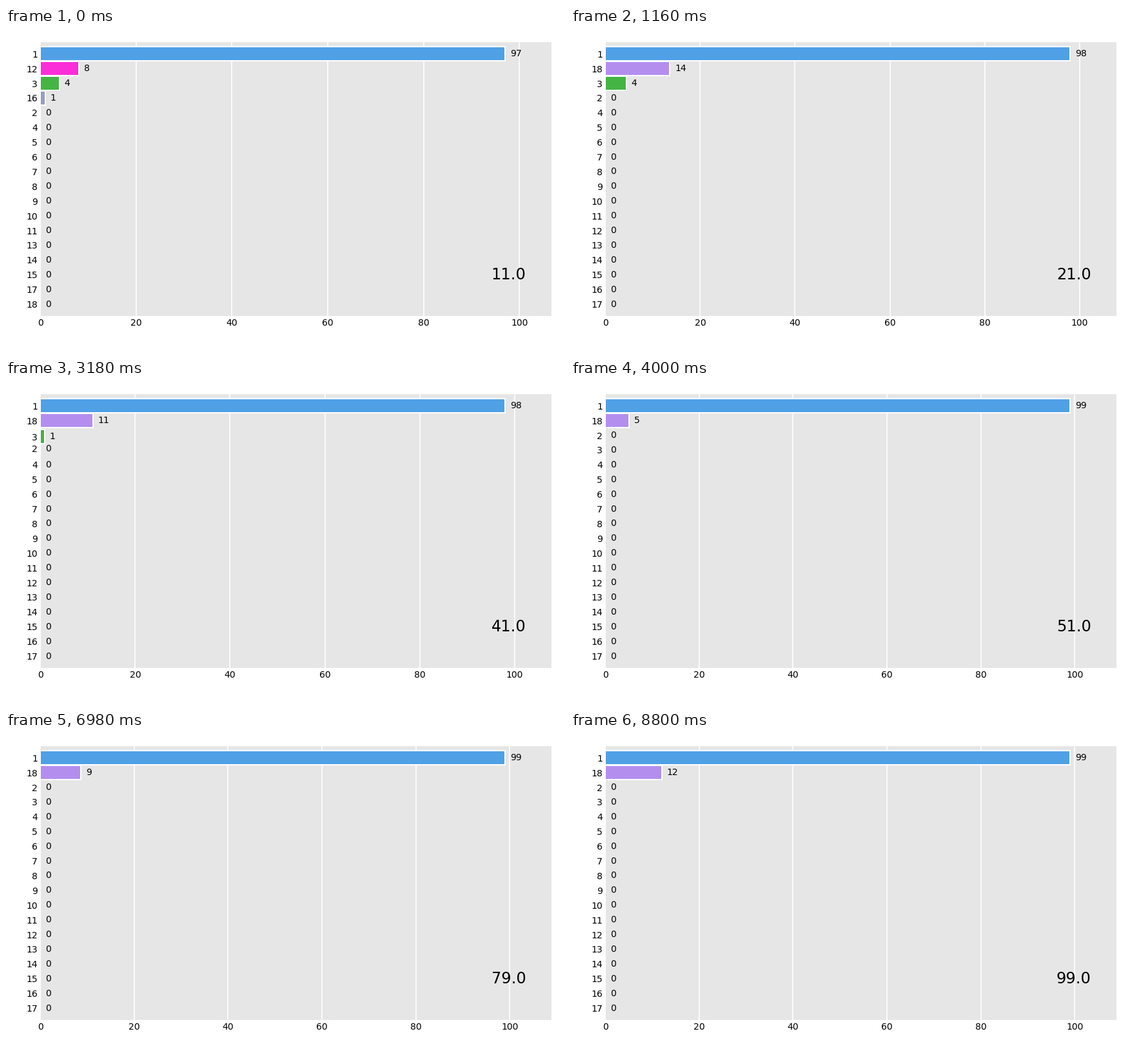
A matplotlib script for the animation above (8820 ms loop, 867 px wide and 504 px high).

```python
import matplotlib.pyplot as plt
import numpy as np
from matplotlib.animation import FuncAnimation

W, H, DPI = 867, 504, 144
LEFT, BOTTOM, AX_W, AX_H = 53.2, 56.07, 792.95, 426
STEPS = 10          # frames per period
BARS = 18
PERIODS = np.arange(11, 100, 2)
ROWS = np.arange(len(PERIODS))

COLORS = {1: "#50a0e6", 2: "#e57ba8", 3: "#44b444",
          12: "#fb2dd8", 16: "#93a0be", 18: "#b38eee"}


def track(*keys):
    """Whole-number values running straight between (row, value) keys."""
    return np.round(np.interp(ROWS, *zip(*keys)))


def challenger():
    """Runner-up: a few turning points with a little noise between them."""
    keys = [(0, 0), (3, 7), (10, 20), (11, 18), (12, 18), (16, 11),
            (17, 8), (18, 8), (22, 4), (23, 8), (24, 8), (25, 13),
            (26, 11), (31, 8), (32, 8), (34, 5), (35, 9), (44, 12)]
    noise = np.random.default_rng(5).integers(-1, 3, len(ROWS))
    noise[[row for row, _ in keys]] = 0
    return track(*keys) + noise


def race():
    """One row per period, one column per bar."""
    table = np.zeros((len(ROWS), BARS + 1))
    table[:, 1] = 97 + (ROWS >= 5) + (ROWS >= 17)
    table[:, 2] = track((0, 0), (3, 6), (5, 0))
    table[:, 3] = track((0, 4), (3, 8), (9, 1), (10, 0))
    table[:, 12] = track((0, 8), (3, 0))
    table[:, 16] = ROWS == 0
    table[:, 18] = challenger()
    # Brief returns of the small bars
    table[16, 3] = 1
    table[[36, 42], 2] = 1
    return table[:, 1:]


values = race()
# Largest value on top; ties keep column order
order = np.argsort(-values, axis=1, kind="stable")
places = BARS - np.argsort(order, axis=1)

plt.rcParams["font.family"] = "DejaVu Sans"
fig = plt.figure(figsize=(W / DPI, H / DPI), dpi=DPI, facecolor="white")
ax = fig.add_axes([LEFT / W, BOTTOM / H, AX_W / W, AX_H / H], facecolor=".9")
ax.set_ylim(.2, BARS + .8)
ax.set_xticks(range(0, 101, 20))
ax.set_yticks([])
ax.tick_params(labelsize=7, length=0, pad=2)
ax.grid(True, axis="x", color="white")
ax.set_axisbelow(True)
for spine in ax.spines.values():
    spine.set_visible(False)

bars = ax.barh(places[0], values[0], height=.95, ec="white", lw=1,
               color=[COLORS.get(i + 1, ".6") for i in range(BARS)])
names = [ax.text(-4 / AX_W, 0, str(i + 1), size=7, ha="right",
                 va="center_baseline", transform=ax.get_yaxis_transform())
         for i in range(BARS)]
labels = [ax.text(0, 0, "", size=7, ha="left", va="center")
          for _ in range(BARS)]
period = ax.text(.95, .15, "", size=12, ha="right", va="center",
                 transform=ax.transAxes)


def lerp(table, row, t):
    nxt = min(row + 1, len(table) - 1)
    return table[row] + (table[nxt] - table[row]) * t


def update(frame):
    row, step = divmod(frame, STEPS)
    vals = lerp(values, row, step / STEPS)
    ys = lerp(places, row, step / STEPS)
    right = vals.max() * 1.1
    ax.set_xlim(0, right)
    for bar, name, label, v, y in zip(bars, names, labels, vals, ys):
        bar.set_width(v)
        bar.set_y(y - bar.get_height() / 2)
        name.set_y(y)
        label.set_position((v + .01 * right, y))
        label.set_text(f"{v:.0f}")
    period.set_text(f"{PERIODS[row]:.1f}")
    return []


anim = FuncAnimation(fig, update, frames=(len(PERIODS) - 1) * STEPS + 1,
                     interval=20, repeat=True, repeat_delay=0)
plt.show()
```
